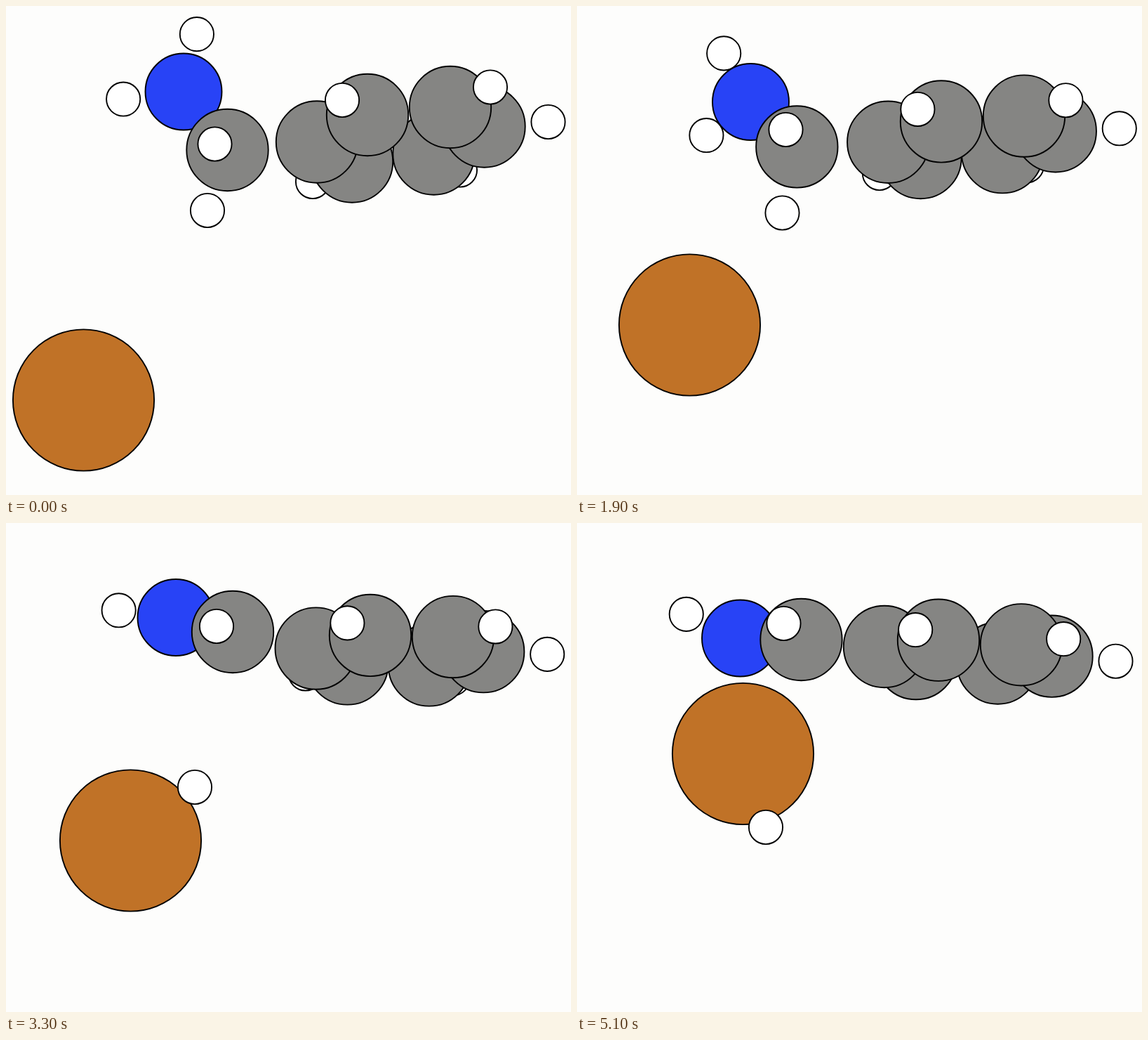
Recreate the animation shown at these times as an HTML page with a canvas. Size 805 by 696 pixels, loop 5200 ms.

```html
<!DOCTYPE html>
<html lang="en">
<head>
<meta charset="utf-8">
<title>Molecule over a metal atom</title>
<style>
  html, body { margin: 0; width: 100%; height: 100%; overflow: hidden; background: #fdfdfc; }
  canvas { display: block; }
</style>
</head>
<body>
<canvas width="805" height="696"></canvas>
<script>
const ctx = document.querySelector('canvas').getContext('2d');
const LOOP = 5.2, STEP = 0.1; // seconds

const H = { radius: 24.1, fill: '#fff' };
const C = { radius: 58.2, fill: '#858583' };
const N = { radius: 54.5, fill: '#2843f6' };
const Cu = { radius: 100.6, fill: '#c07227' };

// Linear track through key points [time, ...values].
const track = (...keys) => t => {
  const next = keys.findIndex(([time]) => time >= t);
  if (next < 1) return keys.at(next).slice(1);
  const from = keys[next - 1], to = keys[next];
  const k = (t - from[0]) / (to[0] - from[0]);
  return from.map((v, i) => v + k * (to[i] - v)).slice(1);
};

// Track of [angle in degrees, distance] around a moving centre.
const orbit = (centre, polar) => t => {
  const [x, y] = centre(t), [angle, distance] = polar(t);
  const a = angle * Math.PI / 180;
  return [x + distance * Math.cos(a), y + distance * Math.sin(a)];
};

const smoothstep = (a, b, t) => {
  const k = Math.min(1, Math.max(0, (t - a) / (b - a)));
  return k * k * (3 - 2 * k);
};

// The ring moves as a rigid body: it sways, turns, tilts along its axis and rolls about it.
const sway = track([0, 0], [1.9, 4], [2.4, 0], [3.3, 4], [5.1, 0]);
const ring = (x, y, depth) => t => {
  const along = (x - 443) / 250 + 0.08 * depth;
  const turn = 11 * Math.sin(Math.PI * t / 8);
  const left = -19 * smoothstep(2.4, 3.6, t), right = 3.6 * t;
  const roll = 7.8 * t;
  return [
    x + sway(t)[0] - depth * turn,
    y + left + along * (right - left) + (0.5 - depth) * roll
  ];
};

const metal = track([0, 110.5, 561], [0.6, 127.5, 535], [1.1, 144, 496.5], [1.9, 160.5, 454],
  [2.4, 206.5, 420.5], [3, 176, 452.5], [3.3, 177.5, 452], [4, 190, 410], [5.1, 236.5, 328.5]);
const nitrogen = track([0, 253, 122], [1.1, 247.5, 136.5], [1.9, 247.5, 136.5],
  [2.4, 247.5, 122], [3.3, 242, 134.5], [4, 240, 138.5], [5.1, 232.5, 164]);
const carbon = track([0, 315.5, 205], [1.1, 315.5, 205], [2.4, 312, 197.5],
  [3.3, 323, 155], [4, 321, 155], [5.1, 319.5, 166]);

const FRONT = 0, AXIS = 0.5, BACK = 1, H_FRONT = -0.32, H_BACK = 1.35;

// Painted back to front.
const atoms = [
  [Cu, metal],
  [H, orbit(nitrogen, track([0, -77, 84], [1.1, -87, 84], [1.9, -119, 79],
    [2.4, -176.5, 82], [4, -170, 82], [5.1, -156, 84]))],
  [H, orbit(nitrogen, track([0, 173, 86.5], [1.1, 166, 86.5], [1.9, 143, 79], [2.4, 110, 20]))],
  [N, nitrogen],
  [C, carbon],
  [H, track([0, 297.5, 196.5], [1.9, 297.5, 176], [2.4, 298, 176],
    [3.3, 300, 147], [4, 294.5, 148.5], [5.1, 294.5, 143])],
  [H, track([0, 287, 291], [1.1, 291, 296.5], [1.9, 292.5, 294.5], [2.4, 281.5, 291],
    [3.3, 269, 376], [4, 287, 409], [5.1, 269, 433])],
  [H, ring(437, 250, H_BACK)],
  [H, ring(647, 233.5, H_BACK)],
  [C, ring(493, 221.5, BACK)],
  [C, ring(609.5, 210.5, BACK)],
  [C, ring(681.5, 171.5, AXIS)],
  [C, ring(443, 193.5, AXIS)],
  [C, ring(515, 155, FRONT)],
  [C, ring(633, 144, FRONT)],
  [H, ring(479, 134, H_FRONT)],
  [H, ring(690, 115.5, H_FRONT)],
  [H, ring(772.5, 165, AXIS)]
];

function draw() {
  const now = performance.now() / 1000 % LOOP;
  const t = Math.floor(now / STEP) * STEP;
  ctx.fillStyle = '#fdfdfc';
  ctx.fillRect(0, 0, 805, 696);
  ctx.lineWidth = 1.9;
  for (const [kind, position] of atoms) {
    const [x, y] = position(t);
    ctx.beginPath();
    ctx.arc(x, y, kind.radius, 0, 2 * Math.PI);
    ctx.fillStyle = kind.fill;
    ctx.fill();
    ctx.stroke();
  }
  requestAnimationFrame(draw);
}
draw();
</script>
</body>
</html>
```
